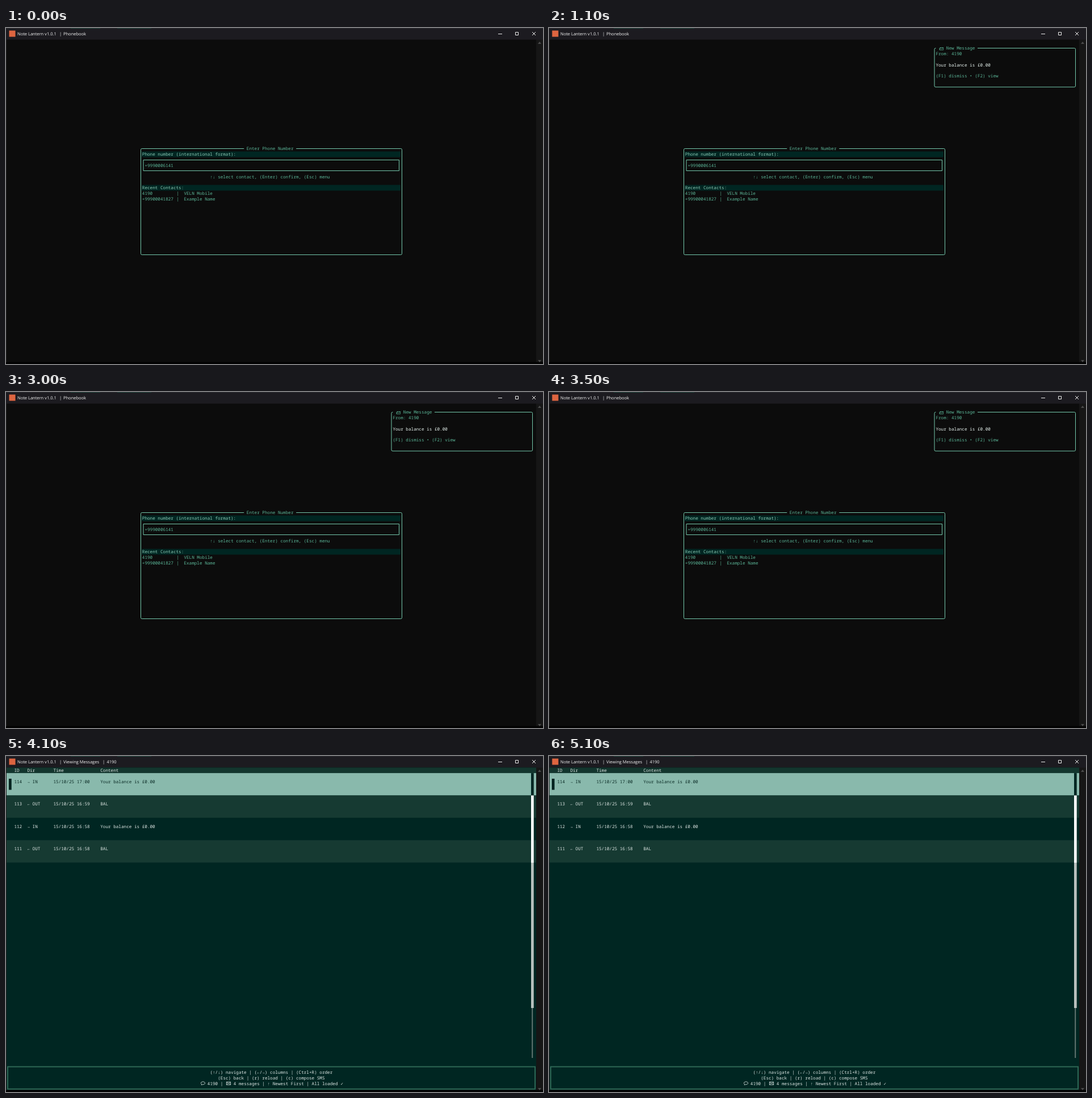
Recreate the animation shown at these times as an HTML page. Size 946 px wide and 592 px high, loop 6 s.

```html
<!DOCTYPE html>
<html lang="en">
<head>
<meta charset="utf-8">
<title>Terminal messages</title>
<style>
  html, body { margin: 0; width: 100%; height: 100%; overflow: hidden; background: #0c0c0c; }
  svg { display: block; width: 946px; height: 592px; }
  text { white-space: pre; text-rendering: geometricPrecision; }
  .mono { font: 7.667px "Noto Sans Mono", "DejaVu Sans Mono", monospace; }
  .ui { font: 7.5px "Open Sans", "Noto Sans", sans-serif; fill: #f4f4f4; }
</style>
</head>
<body>
<svg id="stage" viewBox="0 0 946 592"></svg>
<script>
const GREEN = '#5bb597', PALE = '#8ccab5', LINE = '#74c9ac', DEEP = '#002622', WHITE = '#dce5e2';
const SENDER = '4190';
const LOOP = 6000, POPUP_AT = 800, LIST_AT = 3600;

const rect = (x, y, w, h, fill) => `<rect x="${x}" y="${y}" width="${w}" height="${h}" fill="${fill}"/>`;
const path = (d, stroke, width = 1, fill = 'none') =>
  `<path d="${d}" stroke="${stroke}" stroke-width="${width}" fill="${fill}"/>`;
const ui = (x, s) => `<text class="ui" x="${x}" y="12.9">${s}</text>`;
const group = (id, ...parts) => `<g id="${id}">${parts.join('')}</g>`;

// Terminal text is placed by character column and row.
const colX = col => 0.6 + col * 4.6;
const rowY = row => 25.4 + row * 9.85;
const cell = (col, row, s, fill, extra = '') =>
  `<text class="mono" x="${colX(col)}" y="${rowY(row) + 2.75}" fill="${fill}" ${extra}>${s}</text>`;

// Rounded box whose top edge is open between two columns for its title.
const titledBox = (l, t, r, b, from, to) => path(
  `M${colX(from)} ${t}H${l + 2}Q${l} ${t} ${l} ${t + 2}V${b - 2}Q${l} ${b} ${l + 2} ${b}` +
  `H${r - 2}Q${r} ${b} ${r} ${b - 2}V${t + 2}Q${r} ${t} ${r - 2} ${t}H${colX(to)}`, LINE);

const windowFrame = group('frame',
  rect(0, 0, 946, 592, '#0c0c0c'),
  rect(934, 20, 12, 569, '#161616'),
  rect(0, 0, 946, 20.5, '#1c1b20'),
  rect(0, 0, 946, 1, '#2b2c30'),
  rect(114, 0, 52, 1, '#254841'), rect(196, 0, 60, 1, '#254841'),
  rect(0, 588.5, 946, 3.5, '#020202'),
  rect(0, 20, 1, 569, '#202022'),
  rect(5.5, 4.5, 11, 11, '#dd6540'),
  ui(20, 'Note Lantern v1.0.1'), ui(94, '|'),
  path('M867 10.5H874', '#eee'),
  path('M897.5 7.5H902.5V12.5H897.5Z', '#eee'),
  path('M927 7L933 13M933 7L927 13', '#eee'),
  path('M937 28L940 24L943 28Z', 'none', 0, '#4c4c4c'),
  path('M937 585L940 589L943 585Z', 'none', 0, '#4c4c4c'));

const contact = (row, number, name) =>
  cell(52, row, number, GREEN) + cell(65.2, row, '|', GREEN) + cell(68, row, name, GREEN);

const phonebook = group('phonebook',
  ui(101, 'Phonebook'),
  titledBox(237.5, 212.5, 697.5, 399.5, 91, 111),
  cell(92, 19, 'Enter Phone Number', GREEN),
  rect(239, 217.5, 456, 10, DEEP),
  cell(52, 20, 'Phone number (international format):', PALE),
  path('M242 232.5H692.5V251.5H242Z', LINE),
  cell(53, 22, '+9990006141', GREEN),
  cell(78, 24, '↑↓ select contact, (Enter) confirm, (Esc) menu', GREEN),
  rect(239, 276.5, 456, 10, DEEP),
  cell(52, 26, 'Recent Contacts:', PALE),
  contact(27, SENDER, 'VELN Mobile'),
  contact(28, '+99900041827', 'Example Name'));

const popup = group('popup',
  titledBox(679, 35.5, 927.5, 104, 148, 164),
  path('M689 34.5H694.5V38.8H688.5ZM689 34.5L691.7 37L694.5 34.5M687 36H689M687 38H689', GREEN, 0.7),
  cell(152, 1, 'New Message', GREEN),
  cell(148, 2, 'From: ' + SENDER, GREEN),
  cell(148, 4, 'Your balance is £0.00', '#e6f2ee'),
  cell(148, 6, '(F1) dismiss • (F2) view', GREEN, 'font-style="italic"'));

const columns = (row, values, fill) =>
  [3, 8, 18, 36].map((col, i) => cell(col, row, values[i], fill)).join('');

const messages = [
  ['114', '→ IN', '15/10/25 17:00', 'Your balance is £0.00'],
  ['113', '← OUT', '15/10/25 16:59', 'BAL'],
  ['112', '→ IN', '15/10/25 16:58', 'Your balance is £0.00'],
  ['111', '← OUT', '15/10/25 16:58', 'BAL'],
].map((values, i) =>
  rect(1, 30.1 + i * 39.4, 933, 39.4, ['#89b9ac', '#163a32', DEEP, '#163a32'][i]) +
  columns(2 + i * 4, values, i ? WHITE : '#0c2d27'));

const list = group('list',
  ui(101, 'Viewing Messages'), ui(170, '|'), ui(177.5, SENDER),
  rect(1, 20.5, 933, 568, DEEP),
  rect(1, 20.5, 933, 9.6, '#13362e'),
  columns(0, ['ID', 'Dir', 'Time', 'Content'], WHITE),
  ...messages,
  rect(5, 40, 4.7, 19.6, '#00231f'),
  rect(925, 30.1, 4.7, 39.4, DEEP),
  rect(925, 69.5, 4.7, 118.5, '#fdfefe'),
  rect(925, 188, 4.7, 256, '#b9c0be'),
  rect(926.2, 444, 2, 88, '#647571'),
  path('M3 547.5H932V586.8H3Z', '#2f6755', 2),
  cell(78, 54, '(↑/↓) navigate | (←/→) columns | (Ctrl+R) order', WHITE),
  cell(81, 55, '(Esc) back | (r) reload | (c) compose SMS', WHITE),
  path('M344 579.5L344.7 578.3A3.6 2.5 0 1 1 346.2 578.8Z', WHITE, 0.8),
  cell(77, 56, SENDER + ' |', WHITE),
  path('M388.4 574.3H395.6V579.3H388.4ZL392 577.2L395.6 574.3M388.4 579.3L391 576.6M395.6 579.3L393 576.6', WHITE, 0.8),
  cell(87, 56, '4 messages | ↑ Newest First | All loaded', WHITE),
  cell(128, 56, '✓', WHITE));

const stage = document.getElementById('stage');
stage.innerHTML = windowFrame + phonebook + popup + list;

const show = (id, on) => stage.querySelector('#' + id).setAttribute('visibility', on ? 'visible' : 'hidden');

function draw(now) {
  const t = now % LOOP;
  show('phonebook', t < LIST_AT);
  show('popup', t >= POPUP_AT && t < LIST_AT);
  show('list', t >= LIST_AT);
  requestAnimationFrame(draw);
}
draw(0);
</script>
</body>
</html>
```
